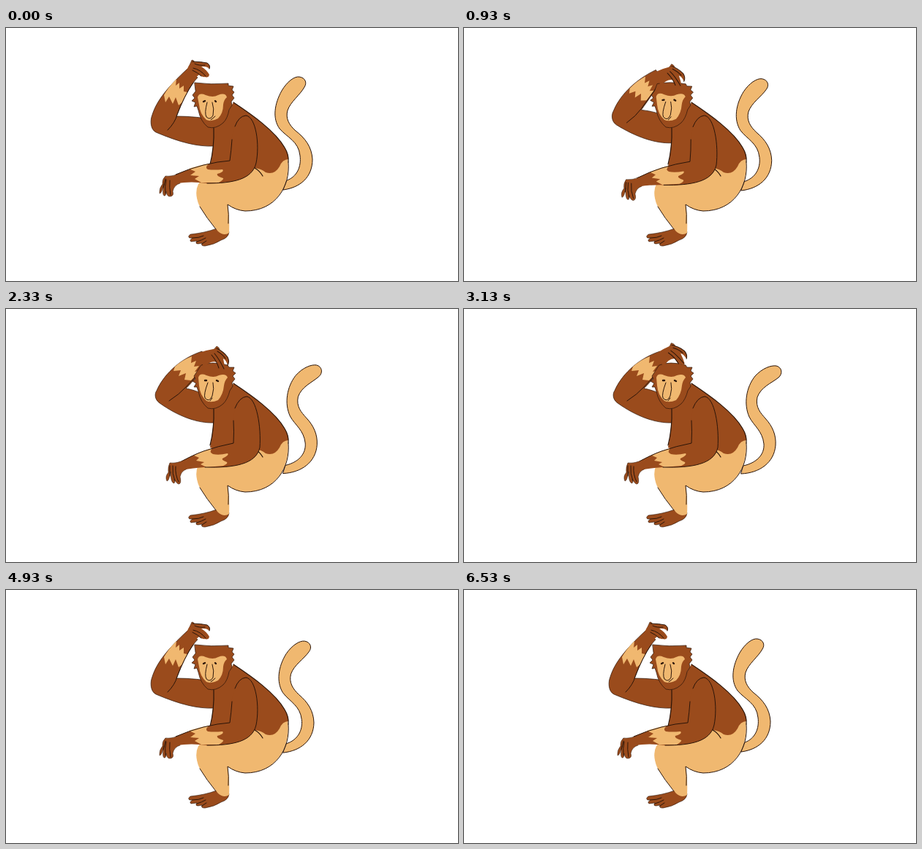
Recreate the animation shown at these times as an HTML page. Size 618x347 px, loop 6.79 s.

```html
<!DOCTYPE html>
<html lang="en">
<head>
<meta charset="utf-8">
<title>Scratching monkey</title>
<style>
  html, body { margin: 0; width: 100%; height: 100%; overflow: hidden; background: #fff; }
  svg { display: block; width: 618px; height: 347px; }
  path { stroke-linejoin: round; stroke-linecap: round; }
</style>
</head>
<body>
<svg id="stage" viewBox="0 0 618 347"></svg>
<script>
const LOOP = 6790, LAST = 98, STEP = 1000 / 15;
const BROWN = '#9a4b1c', TAN = '#f0b870', INK = '#2b1509';
const svg = document.getElementById('stage');
const NS = 'http://www.w3.org/2000/svg';
const parts = [];

// Each part blends from pose a to pose b along one motion channel.
function add(channel, fill, line, a, b = a, parent = svg) {
  const el = document.createElementNS(NS, 'path');
  el.setAttribute('fill', fill);
  if (line) {
    el.setAttribute('stroke', INK);
    el.setAttribute('stroke-width', line);
  }
  el.setAttribute('d', a);
  parent.appendChild(el);
  if (a !== b) parts.push({ el, channel, a, ends: b.match(/-?[\d.]+/g).map(Number) });
}

// Tail
add('tail', TAN, 1,
  'M384 209C398 204 404 190 402 175C400 155 384 150 374 138C364 124 367 104 377 86C384 74 394 66 401 67C409 68 412 75 408 81C402 92 389 101 385 113C382 124 387 133 396 141C409 151 418 163 419 180C419 205 402 219 379 222Z',
  'M382 215C400 211 411 200 410 185C408 167 396 160 390 148C382 130 386 107 398 92C408 81 420 77 427 78C435 80 436 89 430 94C420 102 406 107 401 121C398 135 406 143 412 150C422 161 427 173 426 187C424 211 404 225 379 226Z');

// Raised arm
add('arm', BROWN, 0.7,
  'M284 162C262 163 238 157 205 143C197 139 197 126 200 119C206 100 220 82 248 56L262 68C252 78 243 96 233 121C252 121 270 123 286 126Z',
  'M284 156C262 157 235 147 210 129C203 124 203 116 206 112C214 93 235 69 268 58L276 74C267 84 258 97 246 109C258 111 262 114 286 122Z');
add('arm', TAN, 0,
  'M216 92L218 102L223 94L228 104L232 95L236 106L241 102L248 88L243 87L243 79L237 83L237 75L232 79L233 70Q222 81 216 92Z',
  'M231 79L229 85L239 84L236 92L246 88L244 97L253 98L265 85L258 86L264 78L257 79L260 71L253 74L254 65Q241 70 231 79Z');
add('arm', 'none', 1,
  'M221 140Q231 130 234 119Q243 94 256 75',
  'M223 126Q237 117 246 107Q257 96 266 84');

// Leg and foot
add('', BROWN, 0.6, 'M288 275Q272 281 252 283Q248 286 251 288L255 288Q250 291 253 293L261 292Q258 296 263 296L268 295Q266 299 272 299Q285 297 294 291Q304 288 305 280Z');
add('', 'none', 1, 'M255 288Q264 288 270 285M261 293Q268 291 273 288M268 296L274 292');
add('', TAN, 0, 'M385 178C390 215 370 251 327 251Q314 250 303 242Q306 261 305 281Q298 286 290 279Q274 260 264 243Q257 226 263 214L285 188L340 188Z');
add('', 'none', 1, 'M386 184C389 217 369 251 327 251Q314 250 303 242Q305 256 304 268M265 245Q274 260 287 276');

// Torso
add('', BROWN, 0, 'M284 134L300 120L311 102C335 118 368 141 381 164Q387 174 386 180Q378 180 374 190Q367 202 355 198Q349 193 340 192L320 205L279 190Q284 165 284 134Z');
add('', 'none', 1.2, 'M311 102C335 118 368 141 381 164Q387 174 386 184M284 137Q285 163 279 187M340 192Q347 196 351 203');

// Resting arm and hand
add('near', BROWN, 0,
  'M313 135Q318 121 328 120C342 122 347 160 342 185C337 208 310 213 275 213Q252 210 234 213L232 201Q250 193 270 188Q290 183 306 182Q308 168 309 150Z',
  'M313 136Q319 121 329 120C343 122 349 162 347 190C342 213 312 218 272 217Q256 218 242 221L240 209Q256 200 270 195Q290 188 311 184Q312 168 311 150Z');
add('near', TAN, 0,
  'M250 193L259 197L252 202L264 203L258 207L267 212L291 212Q298 208 297 206Q287 203 289 200Q299 197 296 194Q284 195 276 194Q271 191 278 186Q264 188 250 193Z',
  'M257 201L264 204L260 208L271 210L266 213L274 217L297 215Q304 212 302 210Q294 207 296 205Q306 200 303 198Q291 201 283 199Q277 196 282 191Q270 194 257 201Z');
add('near', 'none', 1,
  'M313 135Q318 121 328 120C342 122 347 160 342 185C337 208 310 213 275 213M309 153Q308 168 306 182Q290 183 270 188Q250 193 232 201',
  'M313 136Q319 121 329 120C343 122 349 162 347 190C342 213 312 218 272 217M311 153Q312 168 311 184Q290 188 270 195Q256 200 240 209');
add('near', BROWN, 0.5,
  'M236 200Q226 204 218 203Q213 208 214 214Q209 220 210 227Q213 227 216 214Q213 228 216 230Q219 231 219 224Q220 232 225 231Q230 230 228 224Q230 215 238 213',
  'M244 207Q234 212 224 211Q221 217 222 224Q217 230 220 236Q223 236 225 223Q225 237 229 239Q232 239 230 233Q234 241 237 240Q240 238 238 230Q240 222 246 220');
add('near', 'none', 1,
  'M219 208Q217 217 218 227M224 209Q223 218 225 229M218 207L215 219',
  'M228 215Q227 226 231 236M232 216Q231 227 236 237M224 215L224 229');

// Head
add('arm', BROWN, 0.7,
  'M258 75Q280 78 304 76L304 79L311 80L309 85L312 88L309 92L312 96L308 101L309 106L305 112Q303 124 297 130Q287 139 276 136Q266 128 263 113L261 107L257 108L259 102L254 100L258 96L255 92L259 87Z',
  'M267 77Q281 71 303 77L305 80L312 80L310 85L314 88L310 92L313 96L309 101L310 106L306 112Q303 124 297 130Q287 139 276 136Q266 128 263 113L261 107L257 107L260 102L255 99L259 96L257 92L261 86Z');
add('arm', TAN, 0,
  'M262 95Q264 88 273 92Q283 96 290 92Q300 88 302 95Q298 98 297 105Q297 117 290 124Q281 129 274 126Q265 118 264 105Z',
  'M263 94Q265 87 274 91Q284 95 291 91Q301 88 303 94Q299 98 298 105Q297 117 290 125Q281 129 274 126Q265 118 264 105Z');
add('arm', 'none', 1,
  'M275 102Q271 117 274 122Q279 127 283 120Q285 111 282 102M280 126Q283 124 286 121',
  'M276 101Q270 117 272 122Q278 129 282 119Q285 109 283 101M279 126Q280 125 282 122');
add('arm', 'none', 2.4,
  'M270 101L272 100M286 100L287 101',
  'M272 98L274 98M288 98L290 99');

// Scratching hand, turning at the wrist
const hand = svg.appendChild(document.createElementNS(NS, 'g'));
add('hand', BROWN, 0.5,
  'M250 53L254 44Q258 44 258 49Z',
  'M283 57L288 51Q293 53 292 58Z', hand);
add('hand', BROWN, 0,
  'M246 60Q250 50 255 46Q266 46 275 48Q280 51 278 56Q274 52 267 53Q274 57 278 64Q277 69 272 67Q268 68 264 64Q260 67 254 74Z',
  'M264 60Q276 56 288 54Q297 58 303 66Q306 72 303 77Q301 70 297 68Q299 76 299 83Q296 86 294 82Q290 84 288 73Q280 70 270 80Z', hand);
add('hand', 'none', 1,
  'M256 55Q266 57 273 66M255 58Q262 61 267 66M258 49Q264 52 272 51M255 46Q266 46 275 48Q280 51 278 56',
  'M285 61Q291 68 298 82M281 63Q288 71 291 81M289 58Q296 62 300 68M288 54Q297 58 303 66Q306 72 303 77', hand);

const clamp = x => Math.min(1, Math.max(0, x));
const mix = (a, b, k) => a + (b - a) * k;
const smooth = x => x * x * (3 - 2 * x);
const ramp = (t, from, to) => smooth(clamp((t - from) / (to - from)));

function draw(t) {
  const pose = {
    arm: ramp(t, 70, 1400) - ramp(t, 3250, 4900),
    hand: ramp(t, 70, 1150) - ramp(t, 3420, 4930),
    near: ramp(t, 70, 1600) - ramp(t, 3400, 4930),
    tail: ramp(t, 0, 2900) - ramp(t, 3150, 5900)
  };
  for (const { el, channel, a, ends } of parts) {
    let i = 0;
    el.setAttribute('d', a.replace(/-?[\d.]+/g, n => mix(+n, ends[i++], pose[channel]).toFixed(2)));
  }
  const lift = (1 - Math.cos((t - 2330) / 337 * 2 * Math.PI)) / 2;
  const k = pose.hand;
  hand.setAttribute('transform', `rotate(${-16 * lift * k * k} ${mix(252, 268, k)} ${mix(64, 68, k)})`);
}

const start = performance.now();
function tick(now) {
  const t = Math.max(0, now - start) % LOOP;
  draw(Math.min(LAST, Math.floor((t + 4) / STEP)) * STEP);
  requestAnimationFrame(tick);
}
draw(0);
requestAnimationFrame(tick);
</script>
</body>
</html>
```
